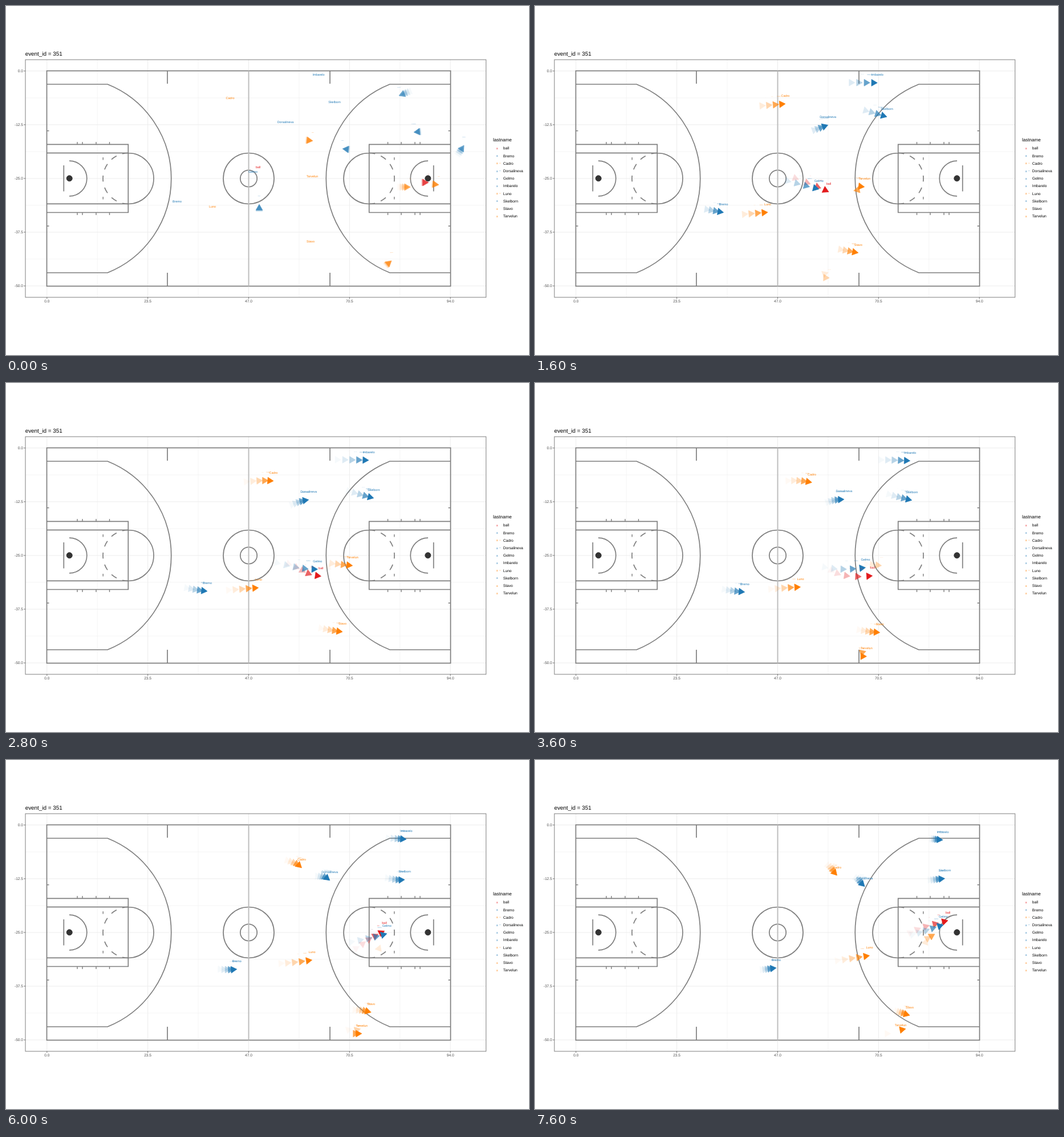
An HTML page that plays this animation: 917x611 px, repeating every 8000 ms.

```html
<!DOCTYPE html>
<html lang="en">
<head>
<meta charset="utf-8">
<title>Court tracking</title>
<style>
  html, body { margin: 0; width: 100%; height: 100%; overflow: hidden; background: #fff; }
  svg { display: block; width: 917px; height: 611px; font-family: "Liberation Sans", Arial, sans-serif; text-rendering: geometricPrecision; }
  .court { fill: none; stroke: #7f7f7f; stroke-width: 1.7; }
</style>
</head>
<body>
<svg viewBox="0 0 917 611">
  <g id="chart"></g>
  <g id="half" class="court">
    <path d="M283 114V136M283 467V490M72 137H178A177.7 177.7 0 0 1 178 467H72"/>
    <path d="M72 242.4H214.3V361.5H72M72 257.4H214.3M72 346.4H214.3M214.5 257.5A44.5 44.5 0 0 1 214.5 346.5"/>
    <path d="M214.5 257.5A44.5 44.5 0 0 0 214.5 346.5" stroke-dasharray="10.75"/>
    <path d="M111 271.2A30.8 30.8 0 0 1 111 332.8M101.3 279V324.5"/>
    <path d="M72 218.5H75.5M72 385.3H75.5M170.2 265V269.5M170.2 334V338.5" stroke-width="1.4"/>
    <path id="ticks" stroke-width="1.4"/>
    <circle cx="111.2" cy="301.8" r="5" fill="#333" stroke="#333" stroke-width="1"/>
  </g>
  <use href="#half" transform="translate(851 0) scale(-1 1)"/>
  <g class="court">
    <rect x="71.5" y="113.5" width="708" height="377"/>
    <circle cx="425.5" cy="302" r="44.5"/>
    <circle cx="425.5" cy="302" r="14.7"/>
    <path d="M425.5 113.5V490.5" stroke="#bebebe" stroke-width="2"/>
  </g>
  <g id="legend"></g>
  <g id="moving"></g>
</svg>
<script>
const STEP = 400, STEPS = 20;
const RED = "#e31a1c", BLUE = "#1f78b4", ORANGE = "#ff7f00";
const FADE = [1, 0.68, 0.32, 0.14, 0.04];
const SHRINK = [1, 0.46, 0.27, 0.12, 0, 0];
const $ = id => document.getElementById(id);

const text = (x, y, s, size, fill = "#000", anchor = "start", opacity = 1) =>
  `<text x="${x}" y="${y}" font-size="${size}" fill="${fill}" text-anchor="${anchor}" opacity="${opacity}">${s}</text>`;

// Smooth curve through values spread evenly over the loop
function curve(v) {
  const last = v.length - 1;
  const slope = i => {
    const a = Math.max(i - 1, 0), b = Math.min(i + 1, last);
    return (v[b] - v[a]) / (b - a);
  };
  return step => {
    const t = step / (STEPS - 1) * last;
    const i = Math.max(0, Math.min(last - 1, Math.floor(t)));
    const u = t - i, w = 1 - u;
    return v[i] * (1 + 2 * u) * w * w + slope(i) * u * w * w
      + v[i + 1] * u * u * (3 - 2 * u) - slope(i + 1) * u * u * w;
  };
}

function path(...points) {
  const x = curve(points.map(p => p[0])), y = curve(points.map(p => p[1]));
  return s => [x(s), y(s)];
}

// Two people share one name, so that marker jumps between two runs
const high = path([537, 312], [601, 319], [662, 323], [708, 301]);
const low = path([497, 475], [557, 478], [611, 479], [641, 478.5]);
const lowSteps = [1, 2, 8, 9, 11, 13, 14, 15, 19];

// tip: arrow tip at a step; end: last tip and drift of the previous round
const players = [
  { name: "ball", color: RED, end: [741, 309, 1, 0],
    tip: path([442, 296], [504, 320], [541, 337], [600, 336], [638, 313], [674, 295], [724, 281]) },
  { name: "Bremo", color: BLUE, end: [444, 347, 0, -1],
    tip: path([300, 356], [348, 364], [392.5, 367], [423, 364]) },
  { name: "Cadro", color: ORANGE, end: [538, 236, 1, 0.1],
    tip: path([393, 175], [463, 171], [509, 182], [529.5, 202]) },
  { name: "Dorsalineva", color: BLUE, end: [715, 221, -1, 0.1],
    tip: path([490, 217], [527, 205], [560, 206], [578, 221.5]) },
  { name: "Gelmo", color: BLUE, end: [590, 250, -1, -0.1],
    tip: path([433, 304], [535.5, 326], [637, 312], [716, 288.5]) },
  { name: "Imbarelo", color: BLUE, end: [689, 157, -4, 1.6],
    tip: path([548, 134], [628.5, 135], [690, 138], [715, 140]) },
  { name: "Luno", color: ORANGE, end: [709, 317, 4, 0],
    tip: path([362, 365], [435, 359], [508, 354], [586.5, 342.5]) },
  { name: "Skelborn", color: BLUE, end: [803, 244, 2, -3],
    tip: path([576, 182], [639, 200], [686, 209.5], [718.5, 207.5]) },
  { name: "Stavo", color: ORANGE, end: [759, 313, 1, 0.1],
    tip: path([534, 426], [585, 435], [628.5, 439], [657, 447]) },
  { name: "Tarvelun", color: ORANGE, end: [676, 446, 1.2, -1],
    tip: s => (lowSteps.includes(s) ? low : high)(s) }
];

function pose(p, s) {
  if (s < 0) {
    const [x, y, dx, dy] = p.end;
    return [x + (s + 1) * dx, y + (s + 1) * dy, Math.atan2(dy, dx)];
  }
  const [x, y] = p.tip(s), [px, py] = p.tip(s - 1);
  return [x, y, Math.atan2(y - py, x - px)];
}

function arrow(x, y, angle, fill, opacity) {
  const deg = angle * 180 / Math.PI;
  return `<path d="M0 0L-10.2 -5.9V5.9Z" transform="translate(${x} ${y}) rotate(${deg})" fill="${fill}" stroke="${fill}" stroke-width=".7" opacity="${opacity}"/>`;
}

function frame(step) {
  let arrows = "", labels = "";
  for (let lag = FADE.length - 1; lag >= 0; lag--) {
    for (const p of players) {
      const s = step - lag;
      const [x, y, angle] = pose(p, s);
      if (s) arrows += arrow(x, y, angle, p.color, FADE[lag]);
      const size = 5.45 * SHRINK[s < 0 ? lag + 1 : lag];
      if (size) labels += text(x, y - 14.3 + size * 0.36, p.name, size, p.color, "middle", FADE[lag]);
    }
  }
  return arrows + labels;
}

function drawChart() {
  let out = "";
  const line = (d, w) => out += `<path d="${d}" stroke="#ebebeb" stroke-width="${w}"/>`;
  for (let i = 0; i < 9; i++) {
    const x = 71.8 + i * 88.42, y = 113.8 + i * 47.03, w = i % 2 ? 0.5 : 0.95;
    line(`M${x} 94V510`, w);
    line(`M34 ${y}H842`, w);
    if (i % 2) continue;
    out += `<path d="M${x} 510V512.5M31.5 ${y}H34" stroke="#333" stroke-width=".8"/>`;
    out += text(x, 519.3, (i * 11.75).toFixed(1), 6.6, "#4d4d4d", "middle");
    out += text(30, y + 2.4, (i ? "-" : "") + (i * 6.25).toFixed(1), 6.6, "#4d4d4d", "end");
  }
  out += `<rect x="34" y="94" width="807.7" height="416" fill="none" stroke="#7f7f7f" stroke-width="1"/>`;
  $("chart").innerHTML = out + text(33.7, 87, "event_id = 351", 9.9);
}

function drawLegend() {
  let out = text(854, 237, "lastname", 8.1);
  players.forEach((p, i) => {
    const y = 249.3 + i * 13.2;
    out += text(861, y + 1.6, "a", 5.4, p.color, "middle", 0.75);
    if ([2, 3, 6].includes(i)) out += `<path d="M865.5 ${y - 0.5}h1.5" stroke="${p.color}" stroke-width=".8" opacity=".7"/>`;
    out += text(871.8, y + 2, p.name, 6.6);
  });
  $("legend").innerHTML = out;
}

$("ticks").setAttribute("d", [125, 134, 158, 181.5].map(x => `M${x} 238V242M${x} 362V366`).join(""));
drawChart();
drawLegend();

let shown = -1;
const start = performance.now();
function tick(now) {
  const step = Math.floor(Math.max(0, now - start) / STEP) % STEPS;
  if (step !== shown) $("moving").innerHTML = frame(shown = step);
  requestAnimationFrame(tick);
}
tick(start);
</script>
</body>
</html>
```
